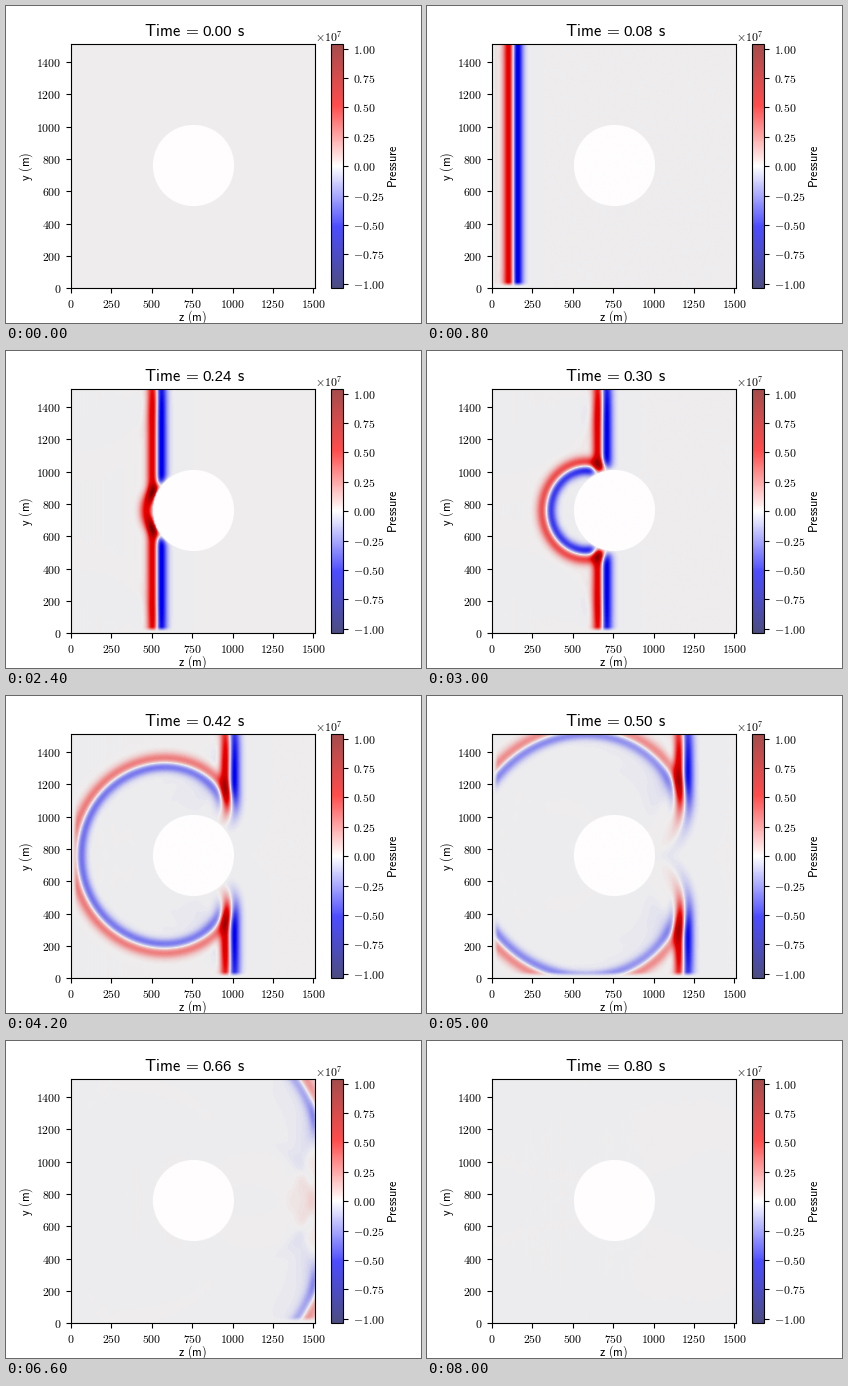
A matplotlib script for the animation above (8.2 s loop, 415 by 317 pixels).

```python
import numpy as np
import matplotlib.pyplot as plt
from matplotlib.animation import FuncAnimation

W, H, DPI = 415, 317, 100
FRAMES, STEP_MS = 41, 200
DT_FRAME = 0.02

# Acoustic model: metres, seconds, pressure in units of 1e7
N, DX, C0 = 302, 5.0, 2500.0
PAD, EDGE = 12, 18
SUBSTEPS = 16
DT = DT_FRAME / SUBSTEPS
COURANT = C0 * DT / DX
AMP, WIDTH, LAG = 0.55, 29.0, 71.0
CENTRE, RADIUS = 755.0, 250.0
P_MAX = 1.038

plt.rcParams.update({
    "mathtext.fontset": "cm",
    "font.size": 8.5,
})

cells = (np.arange(N) + 0.5) * DX
dist = np.hypot(cells[:, None] - CENTRE, cells - CENTRE)


def damping(x, n):
    """Absorbing-layer factor per step at grid positions x."""
    depth = np.clip(np.maximum(EDGE - x, x - (n - 1 - EDGE)), 0, None) / EDGE
    peak = 3 * C0 * np.log(1e3) / (2 * EDGE * DX)
    return np.exp(-peak * depth**2 * DT)


def pulse(u):
    return -AMP * (u / WIDTH) * np.exp(0.5 - u**2 / (2 * WIDTH**2))


def simulate():
    """Plane wave scattered by a pressure-release disc, one field per frame."""
    n = N + 2 * PAD
    core = slice(PAD, PAD + N)
    mask = np.zeros((n, n), bool)
    mask[core, core] = dist <= RADIUS
    d_node = damping(np.arange(n), n)
    d_half = damping(np.arange(n - 1) + 0.5, n)
    # slight loss along the side walls for the grazing wave
    d_px = d_node * d_node[:, None]**0.02
    fade = np.clip((cells - 12) / 25, 0, 1)
    taper = np.outer(fade, fade)

    px, py = np.zeros((n, n)), np.zeros((n, n))
    vx, vy = np.zeros((n, n - 1)), np.zeros((n - 1, n))
    src = 7

    fields = [np.zeros((N, N))]
    for k in range(1, (FRAMES - 1) * SUBSTEPS + 1):
        p = px + py
        vx = (vx - COURANT * np.diff(p, axis=1)) * d_half
        vy = (vy - COURANT * np.diff(p, axis=0)) * d_half[:, None]
        px[:, 1:-1] -= COURANT * np.diff(vx, axis=1)
        py[1:-1] -= COURANT * np.diff(vy, axis=0)
        px *= d_px
        py *= d_node[:, None]
        px[:, PAD + src] += 2 * COURANT * pulse(cells[src] + LAG - C0 * k * DT)
        px[mask] = 0
        py[mask] = 0
        if k % SUBSTEPS == 0:
            fields.append((px + py)[core, core] * taper)
    return fields


def pixel_axes(left, top, right, bottom):
    return fig.add_axes([left / W, 1 - bottom / H,
                         (right - left) / W, (bottom - top) / H])


def label(x, y, text, size=8.7, **kw):
    opts = dict(ha="center", va="center") | kw
    return fig.text(x / W, 1 - y / H, text, fontsize=size, **opts)


def seconds(i):
    return f"{i * DT_FRAME:.2f}"


fields = simulate()
fig = plt.figure(figsize=(W / DPI, H / DPI), dpi=DPI, facecolor="white")

ax = pixel_axes(65.0, 38.2, 309.1, 282.3)
extent = (0, N * DX, 0, N * DX)
im = ax.imshow(fields[0], cmap="seismic", vmin=-P_MAX, vmax=P_MAX,
               origin="lower", extent=extent, aspect="auto")
shade = np.zeros((N, N, 4))
shade[..., 3] = 0.07 * np.clip((dist - RADIUS) / DX + 0.5, 0, 1)
ax.imshow(shade, origin="lower", extent=extent, aspect="auto")
ax.set_xticks(range(0, 1501, 250))
ax.set_yticks(range(0, 1401, 200))
for axis in (ax.xaxis, ax.yaxis):
    axis.set_major_formatter(lambda v, pos: f"${v:.0f}$")

cax = pixel_axes(325, 38.2, 337.1, 282.3)
bar = fig.colorbar(im, cax=cax, ticks=np.linspace(-1, 1, 9),
                   format=lambda v, pos: f"${v:.2f}$")
bar.solids.set_alpha(0.7)

label(186.8, 311.3, r"$\mathsf{z\hspace{0.38}(m)}$")
label(20, 160.3, r"$\mathsf{y\hspace{0.38}(m)}$", rotation=90)
label(387, 160, r"$\mathsf{Pressure}$", rotation=90)
label(309.2, 35.5, r"$\times 10^7$", 8.5, ha="left", va="baseline")

title = dict(ha="left", va="baseline")
label(137.7, 30, r"$\mathsf{Time\hspace{0.18}=}$", 11.9, **title)
clock = label(196.6, 30, seconds(0), 10.8, family="Liberation Sans", **title)
label(231.3, 30, r"$\mathsf{s}$", 11.9, **title)


def update(i):
    im.set_data(fields[i])
    clock.set_text(seconds(i))
    return im, clock


anim = FuncAnimation(fig, update, frames=FRAMES, interval=STEP_MS,
                     repeat=True, repeat_delay=0, blit=False)
plt.show()
```
